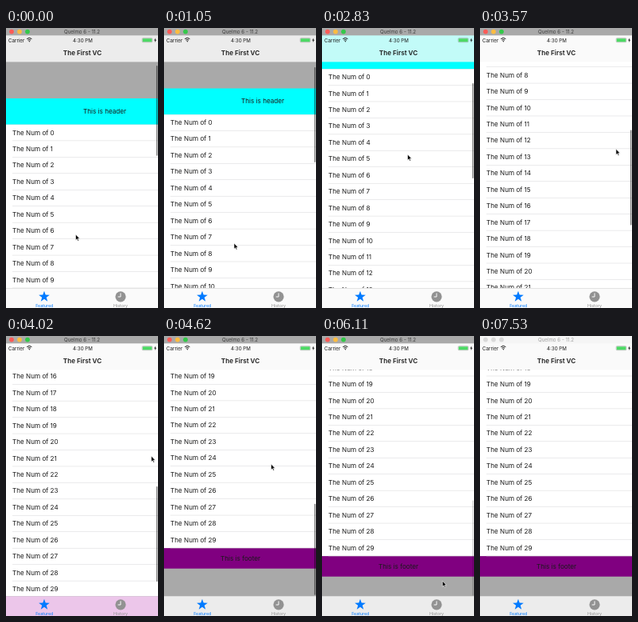
Write an HTML page that moves like this. It is 191x350 px and loops after 7.63 s.

```html
<!DOCTYPE html>
<html lang="en">
<head>
<meta charset="utf-8">
<title>Table insets</title>
<style>
  html, body { margin: 0; width: 100%; height: 100%; overflow: hidden; background: #fff; }
  svg { display: block; width: 100vw; height: 100vh; }
  text { font-family: Inter, "Liberation Sans", sans-serif; font-size: 8.15px; fill: #1a1a1a; }
  .mid { text-anchor: middle; }
  .small { font-size: 6.2px; }
  .tab { font-size: 5.3px; text-anchor: middle; }
</style>
</head>
<body>
<svg viewBox="0 0 191 350" preserveAspectRatio="none">
  <rect width="191" height="350" fill="#a9a9a9"/>
  <g id="table">
    <rect width="191" height="32.7" fill="#0ff"/>
    <rect y="32.7" width="191" height="613.5" fill="#fff"/>
    <rect y="646.2" width="191" height="25.5" fill="#800080"/>
    <text x="97" y="18.8">This is header</text>
    <text x="71" y="661.5">This is footer</text>
  </g>
  <rect id="thumb" x="188.9" width="1.5" rx=".75" fill-opacity=".5"/>

  <rect id="nav" y="9" width="191" height="33.4"/>
  <text class="small" x="3" y="17.7">Carrier</text>
  <g fill="none" stroke="#111">
    <path d="M26.2 13.6Q29.3 11 32.4 13.6M27.5 15.2Q29.3 13.7 31.1 15.2"/>
    <circle cx="29.3" cy="16.7" r=".4"/>
  </g>
  <text class="mid small" x="96.5" y="17.7">4:30 PM</text>
  <rect x="171.2" y="12.7" width="12.6" height="5" rx="1" fill="none" stroke="#888" stroke-width=".5"/>
  <rect x="171.7" y="13.2" width="11.6" height="4" rx=".5" fill="#4cd964"/>
  <path d="M188.2 12.4L186 15.6H187.4L186.9 18 189.1 14.7H187.7Z" fill="#111"/>
  <text class="mid" x="96" y="34" font-weight="600">The First VC</text>

  <rect id="tabs" y="325" width="191" height="25"/>
  <rect y="325" width="191" height=".4" fill="#c0c0c0"/>
  <path id="star" fill="#007aff"/>
  <text class="tab" x="48.2" y="348.6" style="fill:#007aff">Featured</text>
  <circle cx="144" cy="335.8" r="6.6" fill="#929292"/>
  <path d="M144 331.4V336H140.6" fill="none" stroke="#fafafa"/>
  <text class="tab" x="144" y="348.6" style="fill:#929292">History</text>

  <rect id="bar" width="191" height="9.3"/>
  <g id="lights"></g>
  <text id="caption" class="mid small" x="95.5" y="6.9">Quelmo 6 - 11.2</text>

  <path id="cursor" d="M0 0V7.2L1.7 5.7 2.8 8.2 4 7.7 2.9 5.3H5.1Z" fill="#000" stroke="#fff" stroke-width=".6"/>
</svg>

<script>
const LOOP = 7630, BEAT = 148.6, IDLE = 7530;
const ROW = 20.45, ROWS = 30, HEAD = 32.7, FOOT = HEAD + ROW * ROWS, FOOT_H = 25.5;
const TOP = 75.5, END = -371;
const TINT = { back: [236, 236, 236], head: [194, 251, 248], body: [250, 250, 250], foot: [236, 198, 234] };
const $ = id => document.getElementById(id);
const clamp = (v, lo, hi) => Math.max(lo, Math.min(hi, v));

function set(el, attrs) {
  for (const k in attrs) el.setAttribute(k, attrs[k]);
}

function add(parent, tag, attrs, text = '') {
  const el = document.createElementNS('http://www.w3.org/2000/svg', tag);
  set(el, attrs);
  el.textContent = text;
  return parent.appendChild(el);
}

for (let i = 0; i < ROWS; i++) {
  const y = HEAD + i * ROW;
  add($('table'), 'text', { x: 8, y: y + 12.8 }, 'The Num of ' + i);
  add($('table'), 'rect', { x: 8, y: y + ROW - .5, width: 183, height: .5, fill: '#d6d6d8' });
}

const lights = ['#fc5b57', '#fdbc40', '#34c84a'];
const dots = lights.map((c, i) => add($('lights'), 'circle', { cx: 7 + i * 10, cy: 4.6, r: 2.9 }));

const points = Array.from({ length: 10 }, (_, i) => {
  const a = i * Math.PI / 5, r = i % 2 ? 2.9 : 7.2;
  return `${48 + r * Math.sin(a)} ${335.9 - r * Math.cos(a)}`;
});
set($('star'), { d: `M${points.join('L')}Z` });

// Key points are [beat, value...]; the screen updates once per beat
const SCROLL = [[0, 88], [3, 94], [5, 94], [7, TOP], [12, TOP], [15, 48.3], [19, 18.6], [20, 18.6],
  [22, 12], [29, END], [31, END - 10], [36, END - 8], [39, END]];
const POINTER = [[0, 87.5, 258], [3, 88, 269], [8, 88, 269], [15, 97.5, 181.5], [19, 107.5, 158],
  [20, 107.5, 158], [27, 182.5, 150], [31, 134.5, 160], [36, 182.5, 158], [45, 145, 336]];
const FADE = [[8, 1], [11, 0], [12, 0], [15, 1], [39, 1], [42, 0]];

// Eases out from each key point to the next
function at(keys, beat, power, col = 1) {
  const i = keys.findIndex(k => k[0] > beat);
  if (i < 1) return keys.at(i)[col];
  const a = keys[i - 1], b = keys[i];
  const left = (b[0] - beat) / (b[0] - a[0]);
  return b[col] + (a[col] - b[col]) * left ** power;
}

// Bar colour: mix of what lies behind a strip around y
function tint(y, top) {
  const cover = (a, b) => clamp(top + b, y - 6, y + 6) - clamp(top + a, y - 6, y + 6);
  const parts = { head: cover(0, HEAD), body: cover(HEAD, FOOT), foot: cover(FOOT, FOOT + FOOT_H) };
  parts.back = 12 - parts.head - parts.body - parts.foot;
  const mix = [0, 1, 2].map(c => Object.keys(parts).reduce((sum, k) => sum + TINT[k][c] * parts[k] / 12, 0));
  return `rgb(${mix.map(Math.round)})`;
}

function draw(time) {
  const beat = Math.floor(time / BEAT), idle = time >= IDLE;
  const top = at(SCROLL, beat, 1.6);
  set($('table'), { transform: `translate(0 ${top})` });
  set($('nav'), { fill: tint(26, top) });
  set($('tabs'), { fill: tint(337, top) });

  const height = 119 - Math.max(0, top - TOP, END - top) / 2;
  const y = clamp(49 + (TOP - top) * .352, 47, 324.5 - height);
  set($('thumb'), { y, height, opacity: at(FADE, beat, 1) });

  const x = at(POINTER, beat, 2.2), py = at(POINTER, beat, 2.2, 2);
  set($('cursor'), { transform: `translate(${x} ${py})`, visibility: idle ? 'hidden' : 'visible' });

  set($('bar'), { fill: idle ? '#f5f5f5' : '#a9a9a9' });
  $('caption').style.fill = idle ? '#a0a0a0' : '#3c3c3c';
  dots.forEach((d, i) => set(d, { fill: idle ? '#d9d9d9' : lights[i] }));
}

const begin = performance.now();
function tick() {
  draw((performance.now() - begin) % LOOP);
  requestAnimationFrame(tick);
}
draw(0);
requestAnimationFrame(tick);
</script>
</body>
</html>
```
